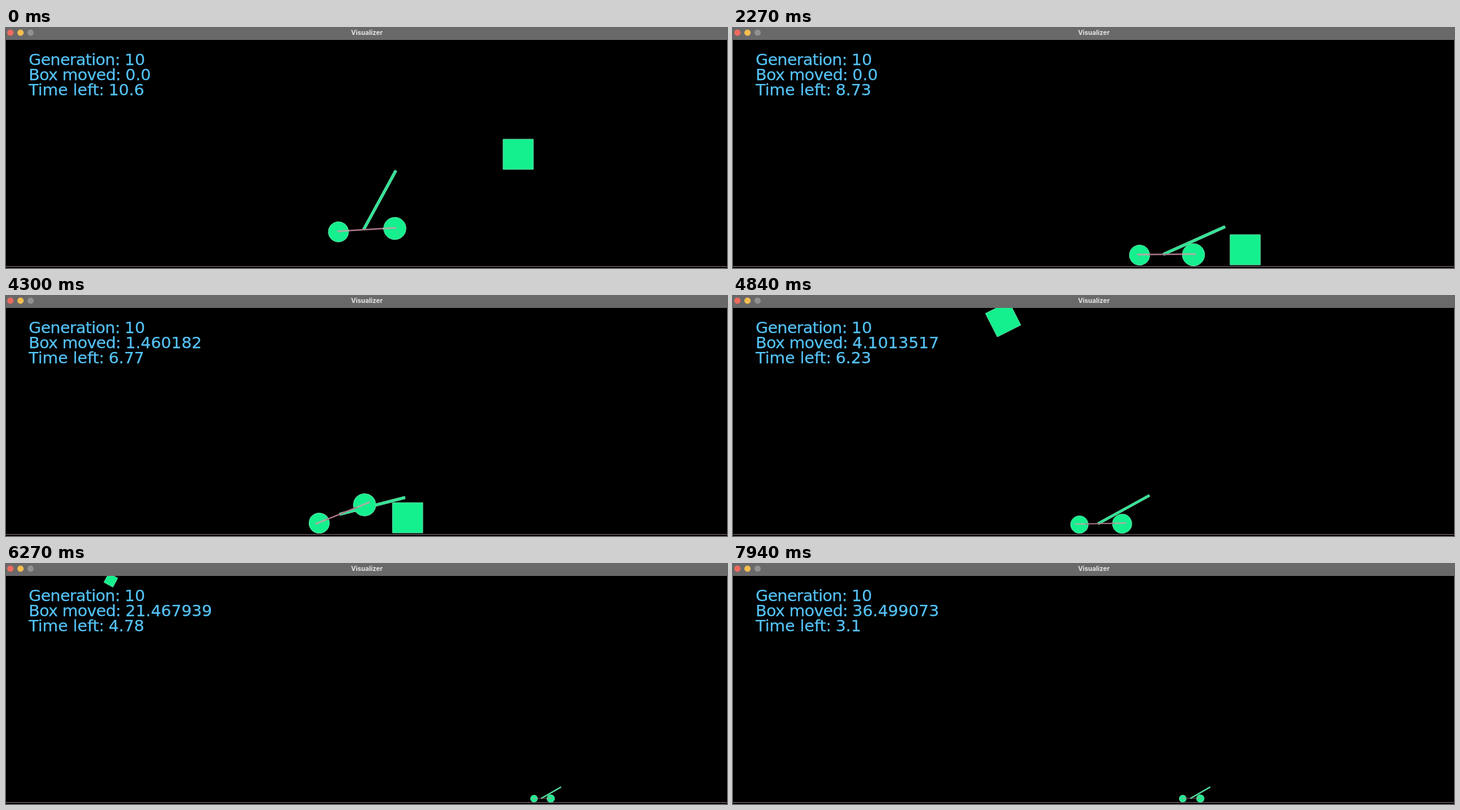
These frames come from a looping animation (1143x382 px, 8000 ms). An HTML page:

```html
<!DOCTYPE html>
<html lang="en">
<head>
<meta charset="utf-8">
<title>Visualizer</title>
<style>
  html, body { margin: 0; width: 100%; height: 100%; overflow: hidden; background: #000; }
  svg { display: block; width: 1143px; height: 382px; }
  .hud { font: 25.4px "DejaVu Sans", sans-serif; fill: #55c3f7; stroke: #55c3f7; stroke-width: .25; }
  .label { letter-spacing: -.5px; }
  .title { font: 700 10.3px Inter, sans-serif; fill: #e6e6e6; text-anchor: middle; }
  .body { fill: #14f08e; stroke: #62dca4; stroke-width: 1; }
  .body, .spoke { vector-effect: non-scaling-stroke; }
  .spoke { stroke: #45d493; stroke-width: 1; }
  .axle { stroke: #b07a8e; stroke-width: 2.2; }
  .hub { stroke: #a6b2a5; stroke-width: 2.6; }
  #arm { fill: #2fe596; }
</style>
</head>
<body>
<svg viewBox="0 0 1143 382">
  <rect width="1143" height="382" fill="#000"/>
  <path d="M0 379.5H1143" stroke="#866a7e"/>
  <g id="world">
    <rect id="arm" class="body" y="-2" width="107" height="4"/>
    <g id="rear"><circle class="body" r="16.1"/><path class="spoke" d="M0 0H13"/></g>
    <g id="front"><circle class="body" r="17.7"/><path class="spoke" d="M0 0H14"/></g>
    <g id="axle">
      <path class="axle" d="M-46.5 0H46.5"/>
      <path class="hub" d="M-46.5 0H-28M25 0H46.5"/>
    </g>
    <rect id="box" class="body" x="-24" y="-24" width="48" height="48"/>
  </g>
  <g class="hud">
    <text x="36" y="59" class="label">Generation:</text><text x="188" y="59">10</text>
    <text x="36" y="83" class="label">Box moved:</text><text x="189.3" y="83" id="moved"></text>
    <text x="36" y="107">Time left:</text><text x="162.7" y="107" id="left"></text>
  </g>
  <rect width="1143" height="19" fill="#6a696a"/>
  <circle cx="7" cy="7.5" r="5" fill="#ee6a5f"/>
  <circle cx="23" cy="7.5" r="5" fill="#f5bd4f"/>
  <circle cx="39" cy="7.5" r="5" fill="#929192"/>
  <text class="title" x="572" y="11">Visualizer</text>
</svg>
<script>
const LOOP = 8000, START = 474, STEP = 59.68, LAST = 125;
const UNIT = 120, GROUND = 379.5, WIDTH = 1143, FAR = 0.336;
const GRAVITY = 16.5 * UNIT, LIFTOFF = 18.6 * UNIT, LAUNCH = 70;

// step, rear wheel x, wheel gap, pitch, arm angle
const CART = [
  [-1, 527, 89.6, 3.5, 61.5],
  [12, 566, 87, 0.4, 30],
  [30, 644.5, 85.5, 0.4, 24.2],
  [37, 668, 85.5, 1, 22],
  [48, 620, 81.6, 48, 27.8],
  [64, 496.5, 77.6, 22, 14.4],
  [71, 455, 78, 2, 28],
  [78, 476, 78, 0.4, 30],
  [83, 413.8, 78, 0.4, 30],
  [LAST, -136.8, 83, 0.4, 30]
];
// step, box moved, time left
const READOUT = [
  [-1, 0, 10.6], [30, 0, 8.73], [38, 0, 8.26], [48, 0.5359616, 7.67], [64, 1.460182, 6.77],
  [LAUNCH, 1.93, 6.41], [83, 11.3391905, 5.63], [110, 30.873205, 4], [LAST, 36.499073, 3.1]
];

const el = id => document.getElementById(id);
const clamp = (v, a, b) => Math.min(b, Math.max(a, v));
const rad = d => d * Math.PI / 180;
const seconds = steps => steps * STEP / 1000;
const fall = (y, rest, k) => Math.min(rest, y + GRAVITY / 2 * seconds(k + 1) ** 2);

function segment(keys, k) {
  let i = 0;
  while (i < keys.length - 2 && k >= keys[i + 1][0]) i++;
  return i;
}

function linear(keys, k, c) {
  const i = segment(keys, k), a = keys[i], b = keys[i + 1];
  return a[c] + (b[c] - a[c]) * (k - a[0]) / (b[0] - a[0]);
}

// monotone cubic through column c
function smooth(keys, k, c) {
  const slope = j => (keys[j + 1][c] - keys[j][c]) / (keys[j + 1][0] - keys[j][0]);
  const tangent = j => {
    if (j === 0) return 0;
    if (j === keys.length - 1) return slope(j - 1);
    const a = slope(j - 1), b = slope(j);
    return a * b > 0 ? 2 * a * b / (a + b) : 0;
  };
  const i = segment(keys, k), h = keys[i + 1][0] - keys[i][0];
  const u = (k - keys[i][0]) / h, v = 1 - u;
  return keys[i][c] * v * v * (1 + 2 * u) + keys[i + 1][c] * u * u * (3 - 2 * u)
    + h * u * v * (tangent(i) * v - tangent(i + 1) * u);
}

function place(id, x, y, angle) {
  el(id).setAttribute('transform', `translate(${x} ${y}) rotate(${angle})`);
}

function drawCart(k) {
  const [x, gap, pitch, tilt] = [1, 2, 3, 4].map(c => smooth(CART, k, c));
  const y = fall(324.5, 361.5, k);
  const dx = Math.cos(rad(pitch)), dy = -Math.sin(rad(pitch));
  const roll = 61 + (x - 527) * 3.4;
  // the frame rides a little ahead of the wheels when it climbs
  const along = gap / 2 - 3 * dy;
  const mx = x + along * dx, my = y - 1 + along * dy;
  place('rear', x, y, roll);
  place('front', x + gap * dx, y + gap * dy, roll);
  place('axle', mx, my, -pitch);
  place('arm', mx - 5 * dx, my - 5 * dy, -tilt);
}

function drawBox(k, moved) {
  const s = seconds(Math.max(0, k - LAUNCH));
  const hook = Math.cos(clamp((k - 48) / 10, -1, 1) * Math.PI / 2) ** 2;
  const height = Math.max(0, LIFTOFF * s - GRAVITY / 2 * s * s);
  place('box', 812 - UNIT * moved, fall(201, 353, k) - 38.5 * hook - height, -7 * hook - 150 * s);
}

function decimal(v, unit) {
  const r = Math.round(v * unit) / unit;
  return Number.isInteger(r) ? r + '.0' : String(r);
}

function render(t) {
  const k = clamp(Math.floor((t - START) / STEP), -1, LAST);
  const moved = linear(READOUT, k, 1);
  const u = clamp((k - 71) / 7, 0, 1);
  const zoom = 1 + (FAR - 1) * u * u * (3 - 2 * u);
  el('world').setAttribute('transform',
    `translate(${WIDTH} ${GROUND}) scale(${zoom}) translate(${-WIDTH} ${-GROUND})`);
  drawCart(k);
  drawBox(k, moved);
  el('moved').textContent = decimal(moved, moved < 16 ? 1e7 : 1e6);
  el('left').textContent = decimal(linear(READOUT, k, 2), 100);
}

const begin = performance.now();
function tick() {
  render((performance.now() - begin) % LOOP);
  requestAnimationFrame(tick);
}
tick();
</script>
</body>
</html>
```
